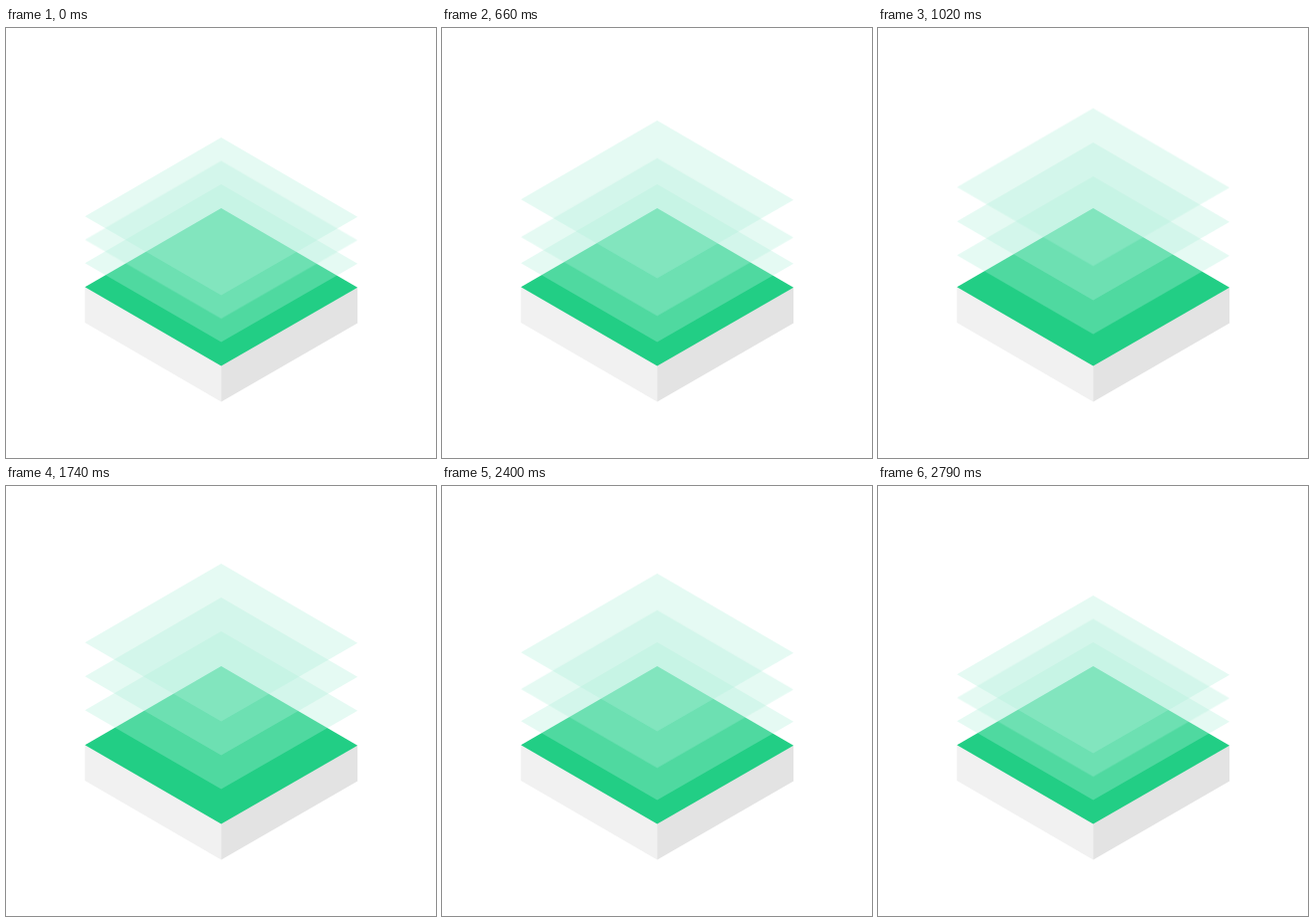
These frames come from a looping animation (432 by 432 pixels, 6.12 s). An HTML page:

```html
<!DOCTYPE html>
<html lang="en">
<head>
<meta charset="utf-8">
<title>Stacked layers</title>
<style>
  html, body { margin: 0; width: 100%; height: 100%; overflow: hidden; background: #fff; }
  svg { display: block; width: 100%; height: 100%; }
  .layer { fill: rgb(174, 239, 217); fill-opacity: .32; }
</style>
</head>
<body>
<svg viewBox="0 0 432 432">
  <defs>
    <path id="tile" d="M216.2 181 353.2 260.7 216.2 339.5 79.3 260.2Z"/>
  </defs>
  <path fill="#f1f1f1" d="M79.3 260.2 216.2 338 216.2 375.4 79.3 296Z"/>
  <path fill="#e3e3e3" d="M353.2 260.7 216.2 338 216.2 375.4 353.2 296.5Z"/>
  <use href="#tile" fill="#22ce85"/>
  <use href="#tile" class="layer"/>
  <use href="#tile" class="layer"/>
  <use href="#tile" class="layer"/>
</svg>
<script>
  const LOOP = 6120;
  const RISE = 'cubic-bezier(.2, .22, .26, 1)';
  const FALL = 'cubic-bezier(.74, 0, .8, .78)'; // RISE played backwards
  const RISE_END = 1385, FALL_START = 1755;

  // bottom layer first: resting and lifted offsets, start of rise, end of fall
  const layers = [
    { low: -24, high: -35, start: 785, end: 2340 },
    { low: -47.5, high: -69, start: 597, end: 2570 },
    { low: -71, high: -103, start: 394, end: 2780 }
  ];

  const key = (time, y, easing = 'linear') =>
    ({ offset: time / LOOP, transform: `translate(0px, ${y}px)`, easing });

  document.querySelectorAll('.layer').forEach((el, i) => {
    const { low, high, start, end } = layers[i];
    el.animate([
      key(0, low),
      key(start, low, RISE),
      key(RISE_END, high),
      key(FALL_START, high, FALL),
      key(end, low),
      key(LOOP, low)
    ], { duration: LOOP, iterations: Infinity });
  });
</script>
</body>
</html>
```
